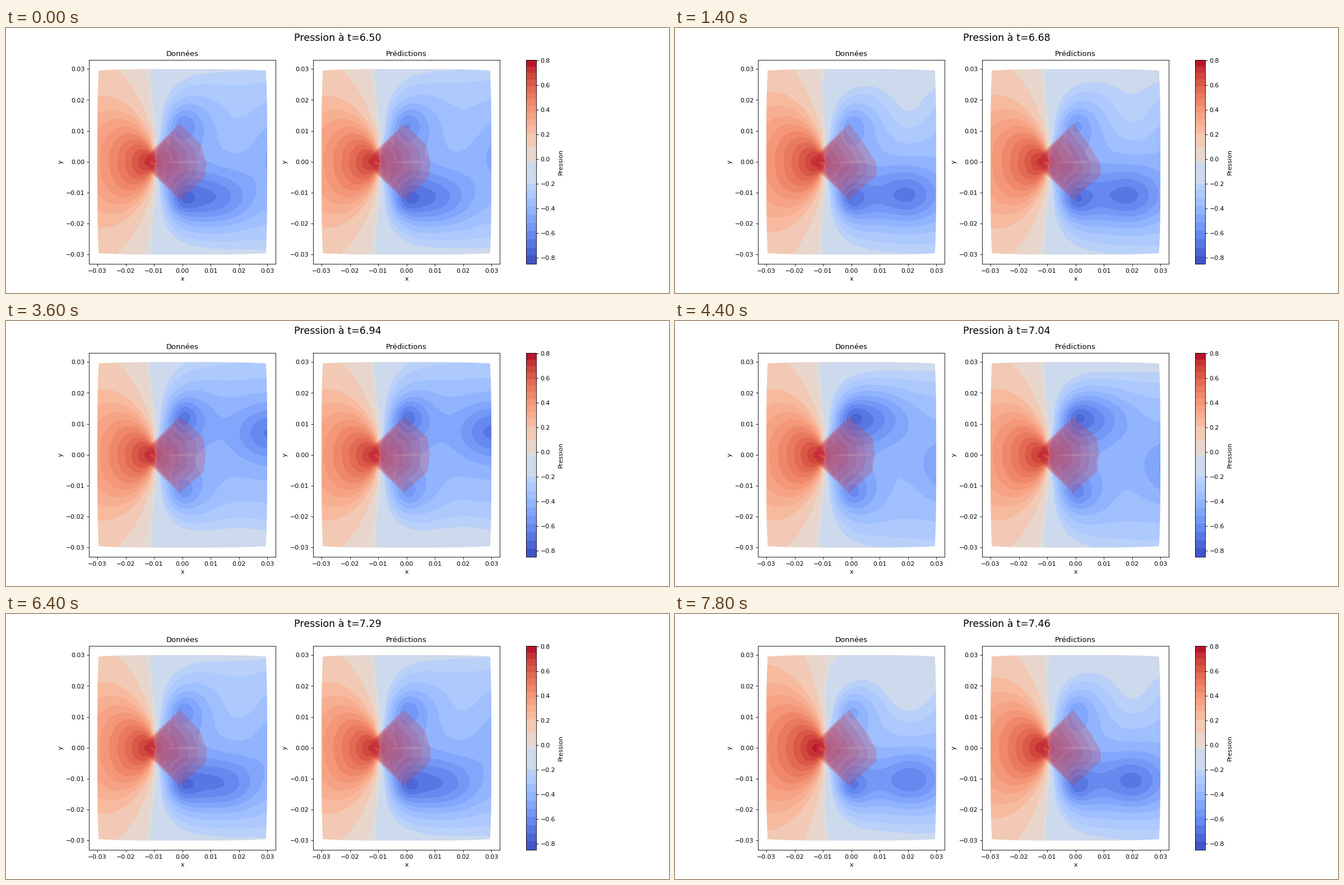
Write a matplotlib script that moves like this. It is 1183 px wide and 473 px high and loops after 8000 ms.

```python
import numpy as np
import matplotlib.pyplot as plt
from matplotlib.animation import FuncAnimation
from matplotlib.cm import ScalarMappable
from matplotlib.colors import BoundaryNorm, ListedColormap
from matplotlib.patches import Polygon

W, H, DPI = 1183, 473, 78.87
FRAMES, INTERVAL = 40, 200
CYCLES_PER_FRAME = 0.157

# Fine steps at both ends, wide ones around zero.
LEVELS = np.concatenate([np.linspace(-.85, -.25, 10), [-.2, -.03, 0, .1, .21],
                         np.linspace(.27, .805, 11)])
mids = (LEVELS[1:] + LEVELS[:-1]) / 2
span = LEVELS[-1] - LEVELS[0]
CMAP = ListedColormap(plt.get_cmap("coolwarm")((mids - LEVELS[0]) / span))
NORM = BoundaryNorm(LEVELS, CMAP.N)

# Coordinates are computed in millimetres and drawn in metres.
grid = np.linspace(-30.2, 30.2, 150)
X, Y = np.meshgrid(grid, grid)
NOISE = np.random.default_rng(4).normal(0, 0.0013, X.shape)


def outline():
    """Square domain with slightly bulging sides."""
    t = np.linspace(-1, 1, 13)
    side = 29.6 * t + 1j * (30 - 0.45 * t ** 4)
    ring = np.concatenate([side[::-1] * 1j ** q for q in range(4)])
    return np.column_stack([ring.real, ring.imag])


def gauss(cx, cy, sx, sy):
    return np.exp(-((X - cx) / sx) ** 2 / 2 - ((Y - cy) / sy) ** 2 / 2)


def front_angle():
    """Angle from the upstream axis, 90 degrees on the zero pressure line."""
    y = np.abs(Y)
    edge = -9.5 - 3 * np.clip((y - 9) / 21, 0, 1)
    return np.degrees(np.arctan2(y * y / (y + 3) + 1e-6, edge - X))


THETA = front_angle()
RADIUS = np.hypot(X + 12.5, Y)
FRONT = 0.735 * np.exp(-RADIUS / 26) * np.cos(
    np.pi / 2 * np.clip(THETA / 90, 0, 1) ** 1.5)
RAMP = np.tanh(np.clip(THETA - 90, 0, None) / 28)
BASE = -0.39 * np.exp(-(np.abs(Y) / 33) ** 3)


def side_wake(phase, side):
    """Pressure of one shear layer; side is -1 below and +1 above."""
    ph = (phase + 0.5) % 1 - 0.5
    core = 0.29 + 0.09 * np.cos(2 * np.pi * (ph - 0.06))
    shoulder = (0.6 * gauss(1, side * 12, 6.5, 6.5)
                + 0.4 * gauss(-0.3, side * 12.7, 3.2, 3.2))

    # The vortex is shed, drifts downstream towards the axis and fades.
    age = min((phase + 0.25) % 1, 0.75)
    life = age / 0.75
    shed = 0.31 * np.sin(np.pi * life ** 0.8) * gauss(
        55 * (1 - np.exp(-1.75 * age)), side * 12.8 * np.cos(np.pi / 2 * life),
        8.5, 6.3)

    calm = 0.12 * np.exp(-((ph - 0.02) / 0.15) ** 2) * gauss(
        20, -side * (15 + 40 * ph), 8, 8)
    return calm - core * shoulder - shed


def pressure(phase, surge):
    tilt = 0.07 * np.sin(2 * np.pi * (phase + 0.07)) * Y / 30
    wake = BASE + tilt + side_wake(phase, -1) + side_wake(phase + 0.5, 1)
    half = (phase + 0.2) % 0.5 - 0.2
    offset = surge * np.exp(-((half - 0.06) / 0.045) ** 2) - 0.01
    p = FRONT + RAMP * wake + offset + NOISE
    return np.clip(p, LEVELS[0] + 1e-3, LEVELS[-1] - 1e-3)


def body(phase, i):
    """Layer i of the nested translucent facets of the obstacle."""
    swing = np.cos(2 * np.pi * phase)
    low, high = max(0, swing) ** 6, max(0, -swing) ** 6

    def half(cut, pull):
        return [(-12.2, 2.6), (-0.8, 12.3),
                (7.5 - 2.7 * cut + 1.5 * pull, 5.5 - 1.3 * pull)]

    lower = [(x, -y) for x, y in half(high, low)]
    nose = (8.3 + 0.6 * (low + high), 0.8 * (high - low))
    pts = np.array(half(low, high) + [nose] + lower[::-1])
    tip = np.array([-12.5, 0])
    return ((pts - tip) * (1 - 0.15 * i) + tip) / 1000


class Panel:
    def __init__(self, fig, left, title, lag, surge):
        self.lag, self.surge = lag, surge
        self.ax = ax = fig.add_axes([left / W, 0.11, 333.3 / W, 0.77])
        ticks = np.arange(-3, 4) / 100
        ax.set(xlim=(-.033, .033), ylim=(-.033, .033), title=title,
               xlabel="x", ylabel="y", xticks=ticks, yticks=ticks)
        self.clip = Polygon(outline() / 1000, transform=ax.transData)
        self.fill = None
        self.layers = []
        for i in range(6):
            layer = Polygon(body(0, i), fc="#d23a3c" if i == 0 else "#c02840",
                            ec="none", alpha=0.25 if i == 0 else 0.15, zorder=2)
            self.layers.append(ax.add_patch(layer))
        self.sliver([(-11.8, .2), (-8.2, -.5), (-10.4, -1.1)], "#e8573c", .6)
        self.sliver([(-7, -.2), (3, .5), (8, 0), (3, -.6)], "#c8a4c0", .3)

    def sliver(self, pts, color, alpha):
        self.ax.add_patch(Polygon(np.array(pts) / 1000, fc=color, ec="none",
                                  alpha=alpha, zorder=2.1))

    def draw(self, k):
        phase = (k - 7) * CYCLES_PER_FRAME - self.lag
        if self.fill is not None:
            self.fill.remove()
        self.fill = self.ax.contourf(
            X / 1000, Y / 1000, pressure(phase, self.surge),
            levels=LEVELS, cmap=CMAP, norm=NORM)
        self.fill.set_clip_path(self.clip)
        for i, layer in enumerate(self.layers):
            layer.set_xy(body(phase, i))


def add_colorbar(fig):
    cax = fig.add_axes([927.5 / W, 0.11, 18.2 / W, 0.77])
    ticks = np.arange(-4, 5) / 5
    bar = fig.colorbar(ScalarMappable(NORM, CMAP), cax=cax,
                       spacing="proportional", label="Pression")
    bar.set_ticks(ticks, labels=[f"{v:.1f}".replace("-", "\u2212") for v in ticks])
    bar.minorticks_off()


plt.rcParams["font.family"] = "DejaVu Sans"
# The small margin keeps the pixel size from being rounded down.
fig = plt.figure(figsize=((W + 0.01) / DPI, (H + 0.01) / DPI), dpi=DPI,
                 facecolor="white")
heading = fig.suptitle("", fontsize=16)
panels = [Panel(fig, 147.9, "Données", 0, 0.11),
          Panel(fig, 547.9, "Prédictions", 0.015, 0.07)]
add_colorbar(fig)


def update(k):
    heading.set_text(f"Pression à t={6.504 + 0.0245 * k:.2f}")
    for panel in panels:
        panel.draw(k)
    return []


anim = FuncAnimation(fig, update, frames=FRAMES, interval=INTERVAL,
                     repeat=True, repeat_delay=0, blit=False)
plt.show()
```
